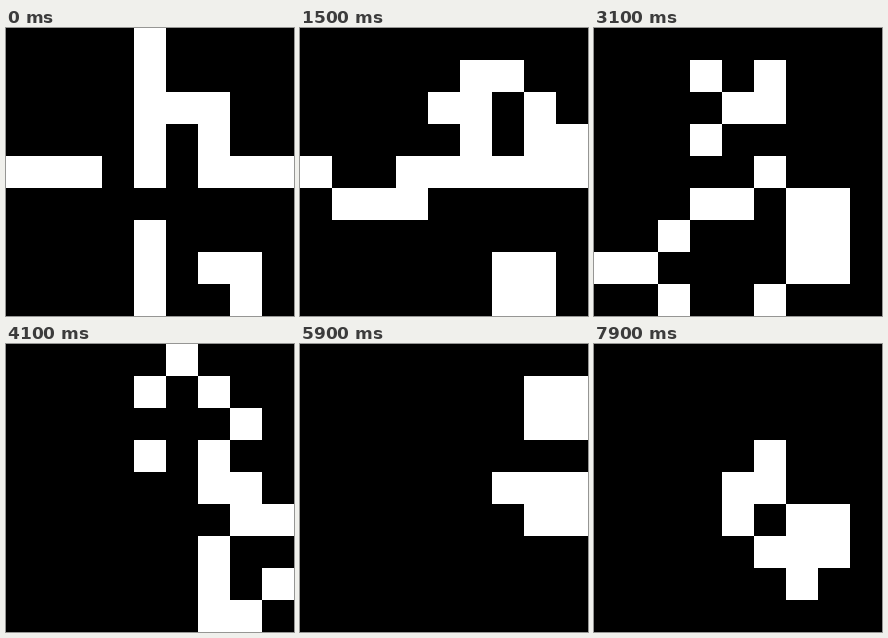
Write an HTML page with a canvas that moves like this. It is 288x288 px and loops after 8000 ms.

```html
<!DOCTYPE html>
<html lang="en">
<head>
<meta charset="utf-8">
<title>Game of Life</title>
<style>
  html, body { margin: 0; width: 100%; height: 100%; overflow: hidden; background: #000; }
  canvas { display: block; width: 288px; height: 288px; }
</style>
</head>
<body>
<canvas id="stage" width="288" height="288"></canvas>
<script>
const SIZE = 9, CELL = 32, STEP = 200, LEAD = 100, LOOP = 8000;

const seed = [
  "....#....",
  "....#....",
  "....###..",
  "....#.#..",
  "###.#.###",
  ".........",
  "....#....",
  "....#.##.",
  "....#..#.",
].map(row => [...row].map(c => c === "#"));

// Everything beyond the edge counts as dead.
function neighbours(grid, x, y) {
  let count = 0;
  for (let dy = -1; dy <= 1; dy++)
    for (let dx = -1; dx <= 1; dx++)
      if ((dx || dy) && grid[y + dy]?.[x + dx]) count++;
  return count;
}

function evolve(grid) {
  return grid.map((row, y) => row.map((alive, x) => {
    const n = neighbours(grid, x, y);
    return n === 3 || (alive && n === 2);
  }));
}

const generations = [seed];
const last = Math.floor((LOOP - 1 + LEAD) / STEP);
while (generations.length <= last) generations.push(evolve(generations.at(-1)));

const ctx = document.getElementById("stage").getContext("2d");

function draw(grid) {
  ctx.fillStyle = "#000";
  ctx.fillRect(0, 0, SIZE * CELL, SIZE * CELL);
  ctx.fillStyle = "#fff";
  grid.forEach((row, y) => row.forEach((alive, x) => {
    if (alive) ctx.fillRect(x * CELL, y * CELL, CELL, CELL);
  }));
}

const start = performance.now();
let shown = -1;

function tick() {
  const time = (performance.now() - start) % LOOP;
  const index = Math.floor((time + LEAD) / STEP);
  if (index !== shown) draw(generations[shown = index]);
  requestAnimationFrame(tick);
}
tick();
</script>
</body>
</html>
```
